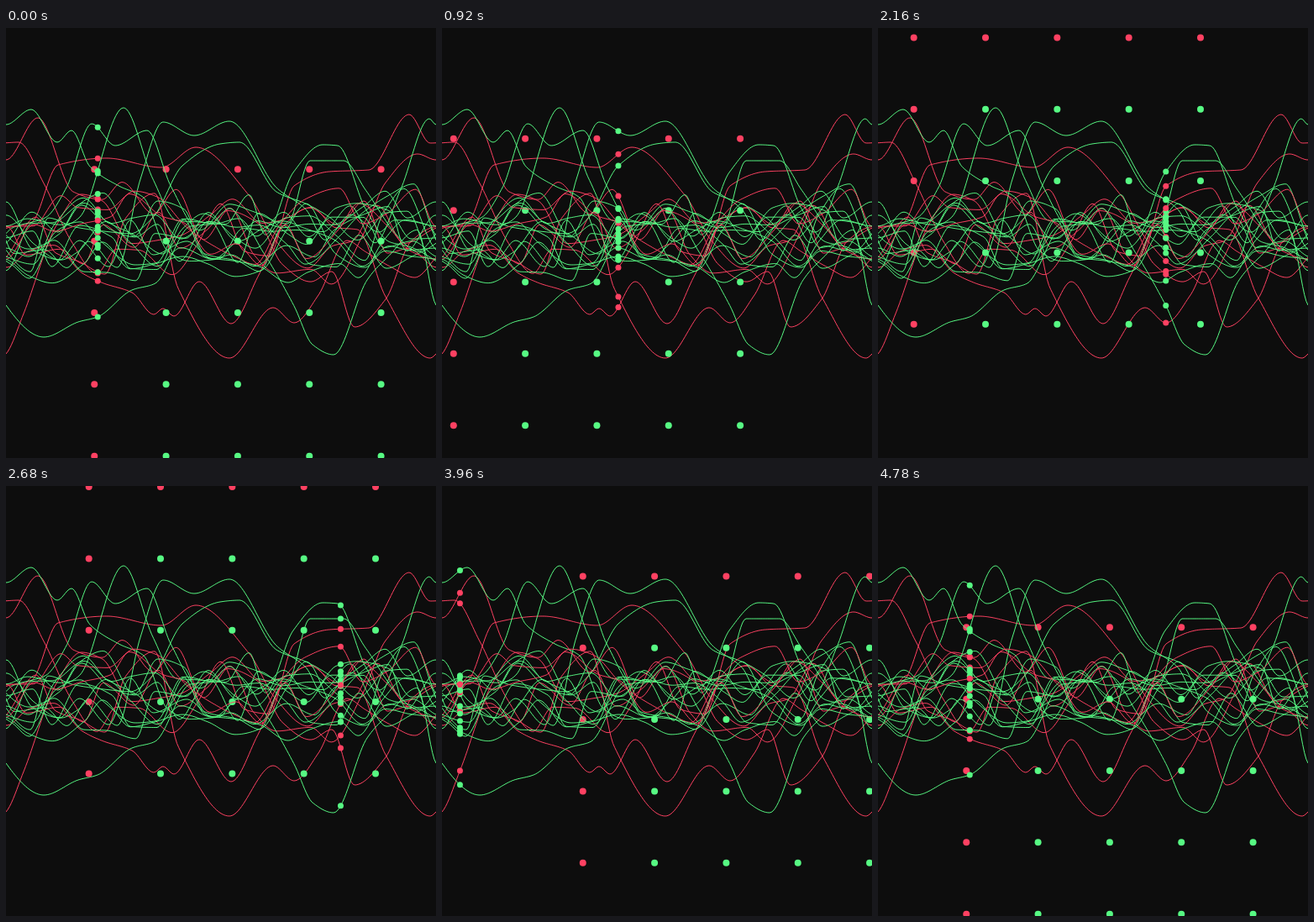
An HTML page with a canvas that plays this animation: 512x512 px, repeating every 4.8 s.

```html
<!DOCTYPE html>
<html>
<head>
<meta charset="utf-8">
<style>
  html, body { margin: 0; height: 100%; overflow: hidden; background: #0d0d0d; }
  canvas { display: block; }
</style>
</head>
<body>
<canvas width="512" height="512"></canvas>
<script>
const SIZE = 512, STEPS = 240, CELL = SIZE / 6, MIDDLE = 246;
const RED = '#ff4162', GREEN = '#57f983';
const ctx = document.querySelector('canvas').getContext('2d');

// Anchor points (x, y, x, y, ...) of the curves that stand out from the bundle
const anchors = {
  [RED]: [
    [0, 388, 21, 340, 60, 235, 452, 320, 505, 393],
    [0, 157, 38, 107, 80, 195, 452, 184, 490, 150],
    [15, 136, 45, 185, 343, 188, 385, 171, 432, 169, 480, 103, 505, 137],
    [62, 163, 120, 155, 185, 166, 226, 142, 290, 200],
    [150, 315, 176, 341, 187, 334, 200, 343, 230, 302, 268, 352, 300, 296],
    [205, 310, 266, 393, 318, 333, 343, 351, 372, 318],
    [388, 290, 415, 356, 452, 323],
  ],
  [GREEN]: [
    [0, 115, 30, 97, 61, 136, 78, 122, 100, 165, 470, 192, 504, 108],
    [72, 190, 102, 114, 130, 140, 168, 122, 362, 158, 402, 158],
    [88, 225, 140, 95, 175, 180, 342, 172, 377, 139, 395, 140, 428, 215],
    [160, 180, 187, 112, 224, 128, 266, 111, 322, 190],
    [210, 164, 255, 138, 278, 136, 322, 195],
    [0, 330, 45, 368, 86, 350, 109, 344, 150, 312, 343, 331, 365, 377, 390, 389, 430, 300],
  ],
};

let seed = 11;
function random() {
  seed = (seed * 16807) % 2147483647;
  return seed / 2147483647;
}

// Fills wide gaps between anchors with a random walk drawn to the middle
function makeKnots(flat) {
  const knots = [];
  for (let i = 0; i < flat.length; i += 2) {
    const x = flat[i];
    let y = flat[i + 1];
    const next = i + 2 < flat.length ? flat[i + 2] : flat[0] + SIZE;
    const parts = next - x > 75 ? Math.round((next - x) / 30) : 1;
    knots.push([x, y]);
    for (let k = 1; k < parts; k++) {
      y = (y + MIDDLE) / 2 + (random() - 0.5) * 85;
      knots.push([x + (next - x) * (k + (random() - 0.5) * 0.4) / parts, y]);
    }
  }
  return [-SIZE, 0, SIZE].flatMap(shift => knots.map(([x, y]) => [x + shift, y]));
}

// Smooth interpolation that levels out at every peak and valley
function sample(knots, x) {
  const slope = i => (knots[i + 1][1] - knots[i][1]) / (knots[i + 1][0] - knots[i][0]);
  const tangent = i => {
    const a = slope(i - 1), b = slope(i);
    return a * b > 0 ? 2 * a * b / (a + b) : 0;
  };
  const i = knots.findIndex(k => k[0] > x) - 1;
  const [x0, y0] = knots[i], [x1, y1] = knots[i + 1];
  const w = x1 - x0, u = (x - x0) / w, v = 1 - u;
  return y0 * (1 + 2 * u) * v * v + y1 * (3 - 2 * u) * u * u
    + w * u * v * (tangent(i) * v - tangent(i + 1) * u);
}

const stepX = k => k * SIZE / (STEPS - 1);

const cells = Array.from({ length: 25 }, (_, i) => {
  const col = i % 5, row = Math.floor(i / 5);
  const color = col && row ? GREEN : RED;
  const knots = makeKnots(anchors[color].shift() || [0, MIDDLE + (random() - 0.5) * 90]);
  const heights = Array.from({ length: STEPS }, (_, k) => sample(knots, stepX(k)));
  const path = new Path2D();
  heights.forEach((y, k) => path.lineTo(stepX(k), y));
  return { x: (col + 1) * CELL, y: (row + 1) * CELL, color, heights, path };
});

function dot(x, y, radius) {
  ctx.beginPath();
  ctx.arc(x, y, radius, 0, 2 * Math.PI);
  ctx.fill();
}

function draw(now) {
  // The first step of the loop repeats the last one
  const step = Math.floor(now / 20) % STEPS || STEPS - 1;
  const k = (step + 52) % STEPS;
  const angle = k / STEPS * 2 * Math.PI;
  ctx.fillStyle = '#0d0d0d';
  ctx.fillRect(0, 0, SIZE, SIZE);
  for (const { x, y, color, heights, path } of cells) {
    ctx.fillStyle = ctx.strokeStyle = color;
    dot(x + CELL * Math.cos(angle), y + CELL * Math.sin(angle), 4);
    ctx.stroke(path);
    dot(stepX(k), heights[k], 3.5);
  }
}

const start = performance.now();
function tick() {
  draw(performance.now() - start);
  requestAnimationFrame(tick);
}
tick();
</script>
</body>
</html>
```
